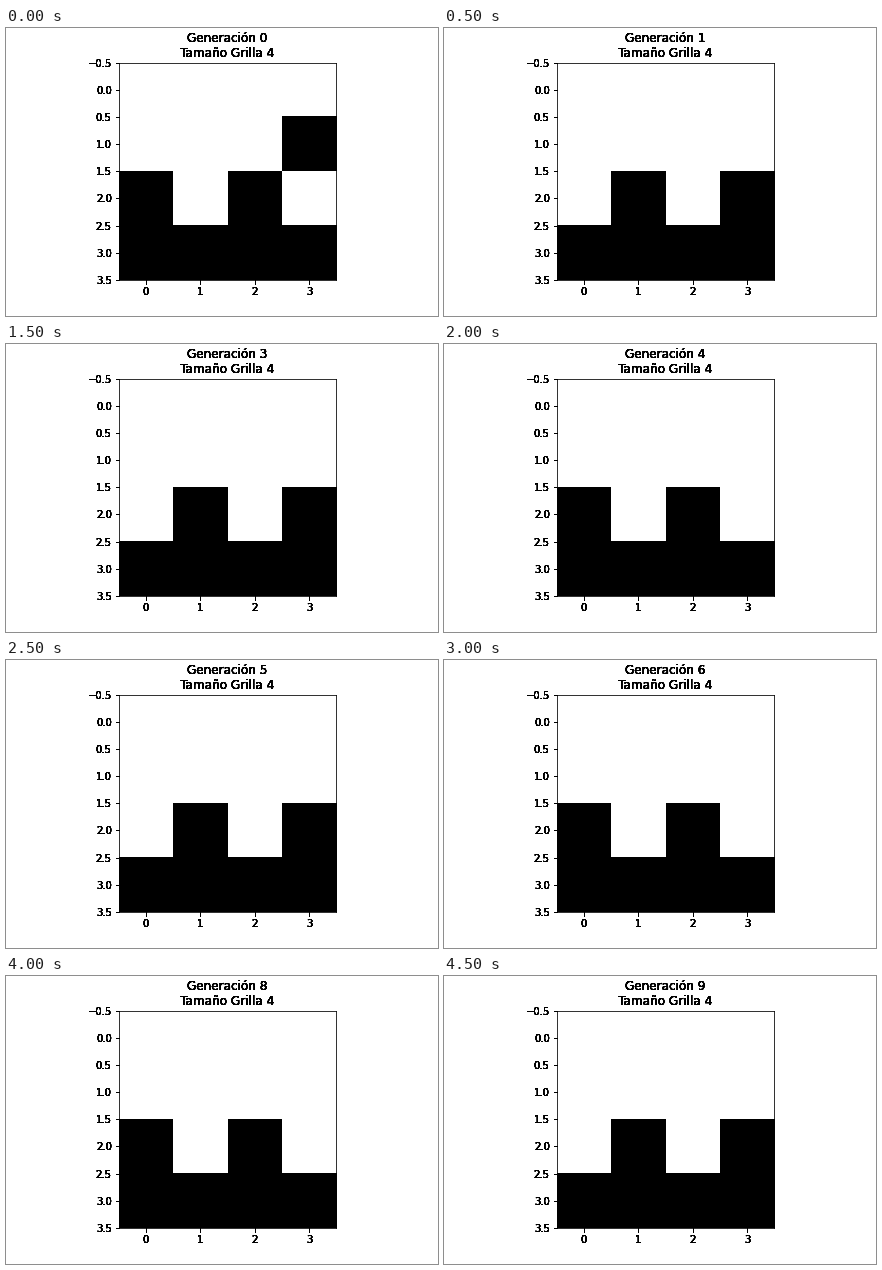
A matplotlib script that plays this animation: 432 px wide and 288 px high, repeating every 5 s.

```python
import numpy as np
import matplotlib.pyplot as plt
from matplotlib.animation import FuncAnimation

SIZE = 4
GENERATIONS = 10
LAYERS = 10  # stacked copies of the labels give them hard, heavy edges

plt.rcParams["font.family"] = "DejaVu Sans"
fig = plt.figure(figsize=(6, 4), dpi=72, facecolor="white")
BOX = [0.125, 0.125, 0.775, 0.755]


def grid(gen):
    """Cells of one generation: 1 is white, 0 is black."""
    cells = np.ones((SIZE, SIZE))
    cells[3] = 0
    cells[2, gen % 2::2] = 0
    if gen == 0:
        cells[1, 3] = 0
    return cells


def make_axes(layer):
    ax = fig.add_axes(BOX, label=f"layer {layer}")
    ax.set(xlim=(-0.5, SIZE - 0.5), ylim=(SIZE - 0.5, -0.5), aspect="equal")
    ax.set_xticks(range(SIZE))
    ax.set_yticks(np.arange(-0.5, SIZE, 0.5))
    if layer:
        ax.patch.set_visible(False)
        ax.spines[:].set_visible(False)
    return ax


axes = [make_axes(i) for i in range(LAYERS)]
image = axes[0].imshow(grid(0), cmap="gray", vmin=0, vmax=1,
                       interpolation="nearest")


def update(gen):
    image.set_data(grid(gen))
    for ax in axes:
        ax.set_title(f"Generación {gen}\nTamaño Grilla {SIZE}", fontsize=12)
    return [image]


anim = FuncAnimation(fig, update, frames=GENERATIONS, interval=500,
                     repeat=True, repeat_delay=0, blit=False)
plt.show()
```
